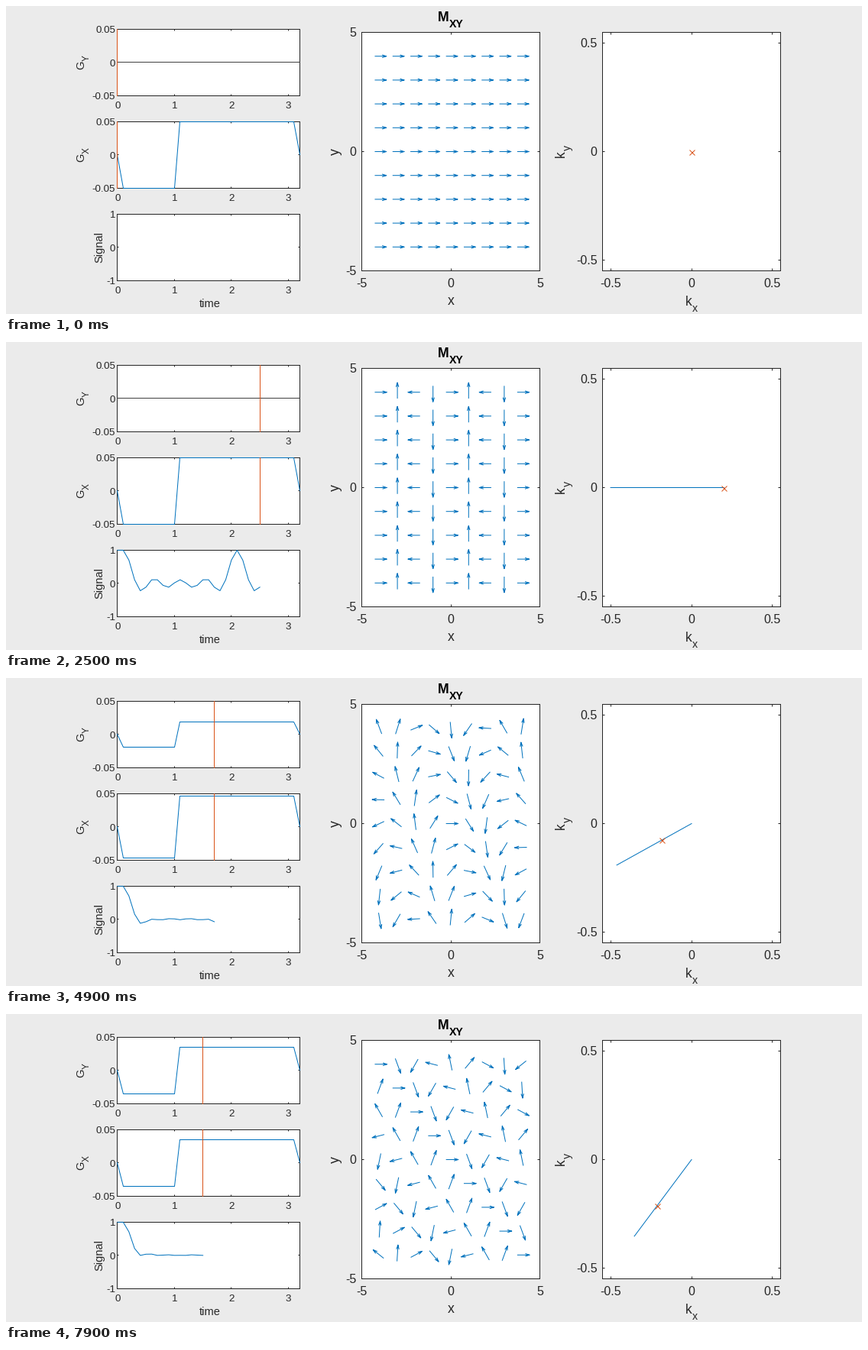
A matplotlib script for the animation above (8 s loop, 1120 by 403 pixels).

```python
import numpy as np
import matplotlib.pyplot as plt
from matplotlib.animation import FuncAnimation
from matplotlib.transforms import Affine2D

W, H, DPI = 1120, 403, 64
PX = 72 / DPI  # points per pixel
BLUE, ORANGE, INK, GRAY = "#0072bd", "#d95319", "#262626", "#414141"
STEPS, FRAMES, SPOKES = 32, 80, 8
DT, G_MAX = 0.1, 0.05

plt.rcParams["font.family"] = "Liberation Sans"
plt.rcParams["path.simplify"] = False
fig = plt.figure(figsize=(W / DPI, H / DPI), dpi=DPI, facecolor="#ebebeb")


def label(x, y, s, size, ha="center", rot=0, **kw):
    """Text whose baseline anchor sits at pixel (x, y)."""
    kw.setdefault("color", INK)
    fig.text(x / W, 1 - y / H, s, fontsize=size * PX, ha=ha, va="baseline",
             rotation=rot, rotation_mode="anchor", **kw)


def sub_label(main, sub, x, y, size, drop, rot=0, **kw):
    """Main text and its subscript, meeting at pixel (x, y)."""
    label(x, y, main, size, "right", rot, **kw)
    dx, dy = (drop, 0) if rot else (0, drop)
    label(x + dx, y + dy, sub, size * 0.8, "left", rot, **kw)


def panel(box, xlim, ylim, xticks, yticks, size, tick, drop, gap):
    """Boxed axes at pixel box (left, top, right, bottom)."""
    l, t, r, b = box
    ax = fig.add_axes([l / W, 1 - b / H, (r - l) / W, (b - t) / H])
    ax.set(xlim=xlim, ylim=ylim, xticks=xticks, yticks=yticks)
    ax.tick_params(direction="in", top=True, right=True, length=tick * PX,
                   width=PX, color=INK, labelbottom=False, labelleft=False)
    for spine in ax.spines.values():
        spine.set(linewidth=PX, color=INK)
    for v in xticks:
        x = l + (v - xlim[0]) / (xlim[1] - xlim[0]) * (r - l)
        label(x + 0.5, b + drop, f"{v:g}", size)
    for v in yticks:
        y = b - (v - ylim[0]) / (ylim[1] - ylim[0]) * (b - t)
        label(l - gap, y + 0.36 * size + 0.5, f"{v:g}", size, "right")
    return ax


def line(ax, color=BLUE, snap=True, **kw):
    """Empty line; unsnapped ones are moved onto pixel centres."""
    ln, = ax.plot([], [], color=color, lw=PX, clip_on=False, zorder=3,
                  snap=snap, **kw)
    if not snap:
        ln.set_transform(ax.transData + Affine2D().translate(0.5, -0.5))
    return ln


def small_panel(top, lim):
    return panel((145.4, top, 383.8, top + 87.1), (0, 3.2), (-lim, lim),
                 range(4), (-lim, 0, lim), 13.33, 2.4, 17.3, 2.4)


def big_panel(left, lim, ticks):
    return panel((left, 34, left + 233, 346), (-lim, lim), (-lim, lim),
                 ticks, ticks, 16, 3.1, 22.3, 6.5)


ax_gy = small_panel(29.9, G_MAX)
ax_gx = small_panel(150.9, G_MAX)
ax_sig = small_panel(271.9, 1)
ax_m = big_panel(465, 5, (-5, 0, 5))
ax_k = big_panel(780, 0.55, (-0.5, 0, 0.5))

sub_label("G", "Y", 102, 71.7, 14.67, 6.5, 90)
sub_label("G", "X", 102, 192.7, 14.67, 6.5, 90)
label(126.5, 316, "Signal", 14.67, rot=90)
label(266.5, 394, "time", 14.67)
sub_label("M", "XY", 580, 19.5, 17.6, 8.3, weight="bold", color="black")
label(582, 391, "x", 17.6)
label(436, 190.5, "y", 17.6, rot=90)
sub_label("k", "x", 898, 391.5, 17.6, 8.3)
sub_label("k", "y", 730.5, 189.5, 17.6, 8.3, 90)

gy_line, gx_line = line(ax_gy), line(ax_gx)
cursors = [line(ax_gy, ORANGE), line(ax_gx, ORANGE)]
sig_line = line(ax_sig, snap=False)
arrows = line(ax_m, snap=False)
path_line = line(ax_k, snap=False)
mark = line(ax_k, ORANGE, snap=False, marker="x", ms=7 * PX, mew=PX)

# Read gradient: short negative lobe, then a long positive one.
wave_t = np.array([0, 0.1, 1, 1.1, 3.1, 3.2])
wave_g = G_MAX * np.array([0, -1, -1, 1, 1, 0])
times = np.arange(STEPS) * DT
k_next = np.cumsum(np.interp(times, wave_t, wave_g))
k_now = np.concatenate(([0], k_next[:-1]))

gx, gy = (a.ravel() for a in np.meshgrid(np.arange(-4, 5), np.arange(-4, 5)))
UNIT = np.array([23.3, 31.2])  # pixels per data unit in the vector panel
HEAD, HALF = 5.0, 1.6


def phase(k, c, s):
    return 2 * np.pi * k * (c * gx + s * gy)


def arrow_path(ang):
    """Broken line through every arrow: shaft, gap, head, gap."""
    d = np.column_stack((np.cos(ang), np.sin(ang)))
    tail = np.column_stack((gx, gy)) - d / 4
    scale = 0.5 * np.hypot(*(np.ptp(tail, axis=0) / 9))
    tip = tail + scale * d
    p = d * UNIT
    p /= np.linalg.norm(p, axis=1, keepdims=True)
    side = np.column_stack((-p[:, 1], p[:, 0]))
    left = tip + (-HEAD * p + HALF * side) / UNIT
    right = tip + (-HEAD * p - HALF * side) / UNIT
    gap = np.full_like(tip, np.nan)
    pts = np.stack((tail, tip, gap, left, tip, right, gap), axis=1)
    return pts.reshape(-1, 2).T


def update(i):
    spoke, n = divmod(i, STEPS)
    c, s = np.cos(spoke * np.pi / SPOKES), np.sin(spoke * np.pi / SPOKES)
    gx_line.set_data(wave_t, c * wave_g)
    gy_line.set_data(wave_t, s * wave_g)
    gy_line.set_color(BLUE if spoke else GRAY)
    for cur in cursors:
        cur.set_data([times[n]] * 2, [-G_MAX, G_MAX])
        cur.set_color(GRAY if n == STEPS - 1 else ORANGE)
    k = k_now[:n + 1]
    sig_line.set_data(times[:n + 1], [np.cos(phase(v, c, s)).mean() for v in k])
    reach = np.array([k.min(), k.max()])
    path_line.set_data(c * reach, s * reach)
    mark.set_data([c * k[-1]], [s * k[-1]])
    arrows.set_data(*arrow_path(phase(k_next[n], c, s)))
    return gx_line, gy_line, *cursors, sig_line, path_line, mark, arrows


anim = FuncAnimation(fig, update, frames=FRAMES, interval=100,
                     repeat=True, repeat_delay=0, blit=False)
plt.show()
```
